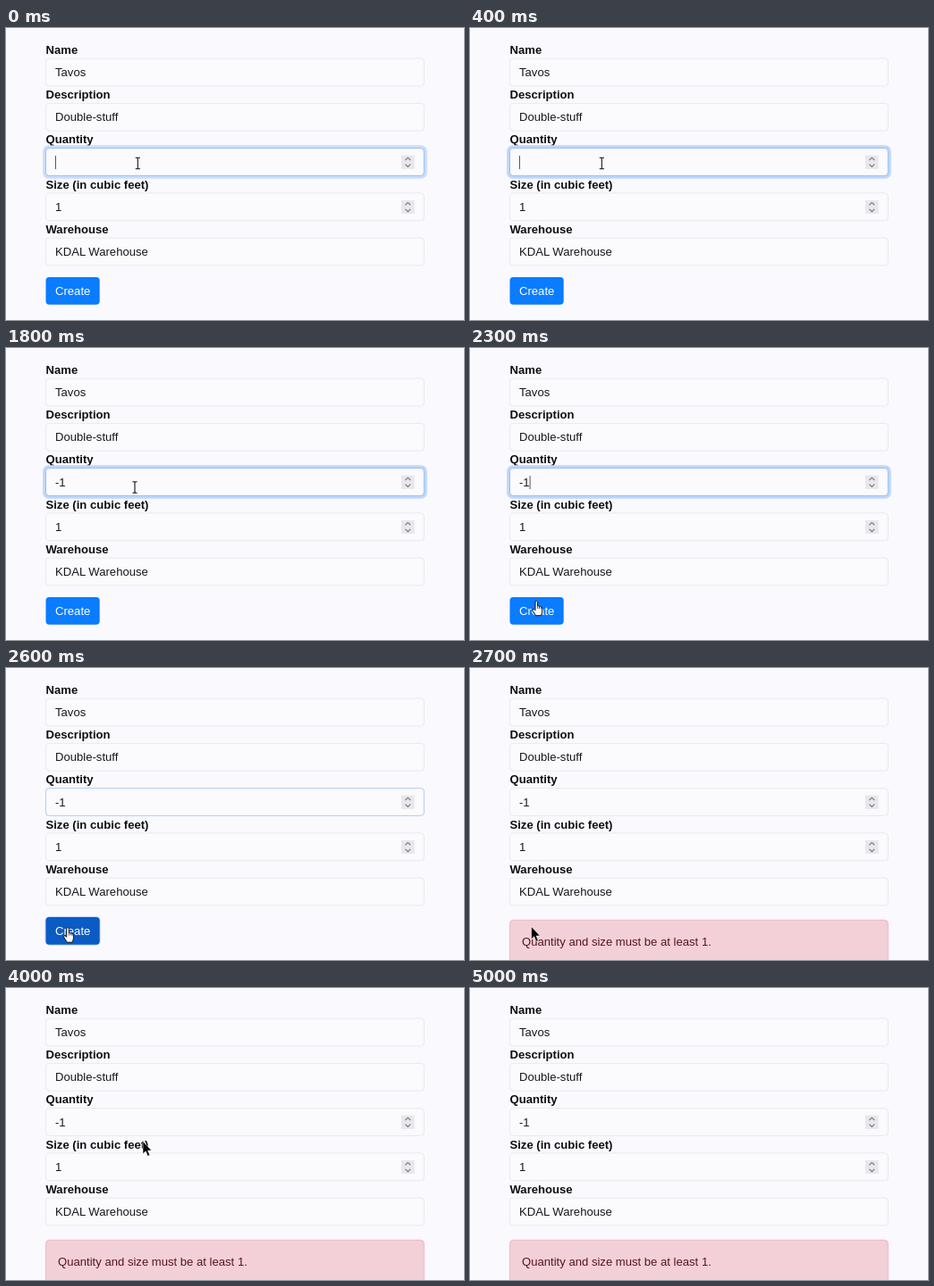
Recreate the animation shown at these times as an HTML page. Size 512 by 327 pixels, loop 5100 ms.

```html
<!DOCTYPE html>
<html lang="en">
<head>
<meta charset="utf-8">
<title>Create item form</title>
<style>
  html, body { margin: 0; width: 100%; height: 100%; overflow: hidden; background: #faf9fd; }
  svg { display: block; width: 100%; height: 100%; }
  text { font: 13.1px "Liberation Sans", Arial, sans-serif; fill: #17181b; white-space: pre; }
  .label { font-weight: bold; fill: #0d0e11; }
  .field { fill: #fbfafd; stroke: #e7e7ee; stroke-width: .9; }
  .spin { fill: #e7e7ec; }
  .chevron { fill: none; stroke: #74747c; stroke-width: 1.1; }
</style>
</head>
<body>
<svg id="stage" viewBox="0 0 512 327">
  <g id="form"></g>
  <g id="focus">
    <rect id="ring" x="42.8" y="132.9" width="426.2" height="34.2" rx="5" fill="none" stroke="#bfd7fc" stroke-width="3.4"/>
    <rect id="edge" x="44.5" y="134.6" width="422.8" height="30.8" rx="3.5" fill="none" stroke="#8fbbfa" stroke-width=".9"/>
  </g>
  <text id="quantity" x="55" y="154.6"></text>
  <rect id="caret" y="143" width="1" height="15" fill="#55565c"/>
  <g id="button">
    <rect id="buttonRing" x="43.6" y="278.2" width="61.9" height="32.6" rx="5" fill="#b9d3fb"/>
    <rect id="buttonFace" x="44.5" y="279" width="60.2" height="30.8" rx="4"/>
    <text x="55" y="299.2" style="fill:#fff">Create</text>
  </g>
  <g id="alert">
    <rect x="44.5" y="282.3" width="422.8" height="48.5" rx="4" fill="#f3d0d8" stroke="#efb4be" stroke-width=".9"/>
    <text x="58" y="311" style="fill:#58151c">Quantity and size must be at least 1.</text>
  </g>
  <g id="beam" fill="none" stroke="#111" stroke-width="1.1">
    <path d="M-2.6-6.2H-.8L0-5.6L.8-6.2H2.6M0-5.6V5.6M-2.6 6.2H-.8L0 5.6L.8 6.2H2.6"/>
  </g>
  <g id="arrow">
    <path d="M0 0V14.3L3.2 11.3L5.4 16.7L7.8 15.7L5.6 10.5H9.8Z" fill="#000" stroke="#fff" stroke-width=".6"/>
  </g>
  <g id="hand">
    <path d="M-1.3 9V1Q0-.9 1.3 1V6Q2.4 5.2 3.2 6.5Q4.4 5.8 5 7.2Q6.4 6.7 6.4 8.5V12Q6.3 14.5 5 16.7H-.7Q-2.7 13.5-4.2 11.2Q-4.8 9.6-3.2 9.2Q-2 9.4-1.3 10.8Z"
      fill="#fff" stroke="#111" stroke-width="1" stroke-linejoin="round"/>
    <path d="M1.3 6V9M3.2 6.5V9M5 7.2V9.3" stroke="#111" stroke-width=".7"/>
  </g>
</svg>
<script>
const LOOP = 5100, STEP = 100;
const TYPE_MINUS = 500, TYPE_ONE = 1300, PRESS = 2600, REJECT = 2700;
const PITCH = 50.25;
const el = id => document.getElementById(id);

const rows = [
  { label: "Name", value: "Tavos" },
  { label: "Description", value: "Double-stuff" },
  { label: "Quantity", value: "", number: true },
  { label: "Size (in cubic feet)", value: "1", number: true },
  { label: "Warehouse", value: "KDAL Warehouse" }
];

const spinner = y => `
  <rect class="spin" x="442" y="${y + 8}" width="14.6" height="15.2"/>
  <path class="chevron" d="M446.4 ${y + 13.4}l2.9-2.8l2.9 2.8M446.4 ${y + 18}l2.9 2.8l2.9-2.8"/>`;

el("form").innerHTML = rows.map(({ label, value, number }, i) => {
  const y = 34.1 + i * PITCH;
  return `<text class="label" x="44.5" y="${y - 5.2}">${label}</text>
    <rect class="field" x="44.5" y="${y}" width="422.8" height="30.8" rx="3.5"/>
    <text x="55" y="${y + 20}">${value}</text>${number ? spinner(y) : ""}`;
}).join("");

// Pointer hot spot: time, x, y
const path = [
  [1800, 144, 156], [1900, 138, 172], [2000, 117, 211], [2100, 92, 256],
  [2200, 77, 281], [2300, 74.3, 283], [2400, 72, 286], [2500, 69, 290.5],
  [2600, 69, 290.5], [2700, 68.5, 289.5], [3500, 68.5, 289.5], [3600, 72, 281],
  [3700, 90, 255], [3800, 116, 217], [3900, 142, 185], [4000, 153, 171.5],
  [4100, 156, 164], [4200, 164, 110], [4300, 172, 30], [4400, 174, -30]
];

function pointerAt(t) {
  if (t < TYPE_MINUS) return [147.3, 151.5];
  const i = path.findIndex(([end]) => end >= t);
  if (t < path[0][0] || i < 0) return null;
  if (i === 0) return path[0].slice(1);
  const [t0, x0, y0] = path[i - 1], [t1, x1, y1] = path[i];
  const k = (t - t0) / (t1 - t0);
  return [x0 + (x1 - x0) * k, y0 + (y1 - y0) * k];
}

function shapeAt(x, y, t) {
  if (t < REJECT && x > 44 && x < 105 && y > 279 && y < 310) return "hand";
  const row = Math.floor((y - 34) / PITCH);
  const inField = row >= 0 && row < 4 && y - 34 - row * PITCH < 31;
  return inField ? "beam" : "arrow";
}

const show = (id, on) => { el(id).style.display = on ? "" : "none"; };

function draw(t) {
  const pressed = t >= PRESS, rejected = t >= REJECT;
  const value = t < TYPE_MINUS ? "" : t < TYPE_ONE ? "-" : "-1";
  el("quantity").textContent = value;

  const lastKey = t < TYPE_MINUS ? 0 : t < TYPE_ONE ? TYPE_MINUS : TYPE_ONE;
  show("caret", !pressed && (t - lastKey) % 1000 < 500);
  el("caret").setAttribute("x", { "": 55, "-": 59.6, "-1": 66.6 }[value]);

  show("focus", !rejected);
  show("ring", !pressed);
  el("ring").style.opacity = t < 100 ? .8 : 1;
  el("edge").style.opacity = pressed ? .65 : 1;

  show("button", !rejected);
  show("buttonRing", pressed);
  el("buttonFace").setAttribute("fill", pressed ? "#0b5bc4" : "#0a7cff");
  show("alert", rejected);

  const at = pointerAt(t);
  const shape = at && shapeAt(...at, t);
  for (const id of ["beam", "arrow", "hand"]) show(id, id === shape);
  if (at) el(shape).setAttribute("transform", `translate(${at})`);
}

const start = performance.now();
function tick(now) {
  const t = Math.max(0, now - start) % LOOP;
  draw(Math.floor(t / STEP) * STEP);
  requestAnimationFrame(tick);
}
draw(0);
requestAnimationFrame(tick);
</script>
</body>
</html>
```
